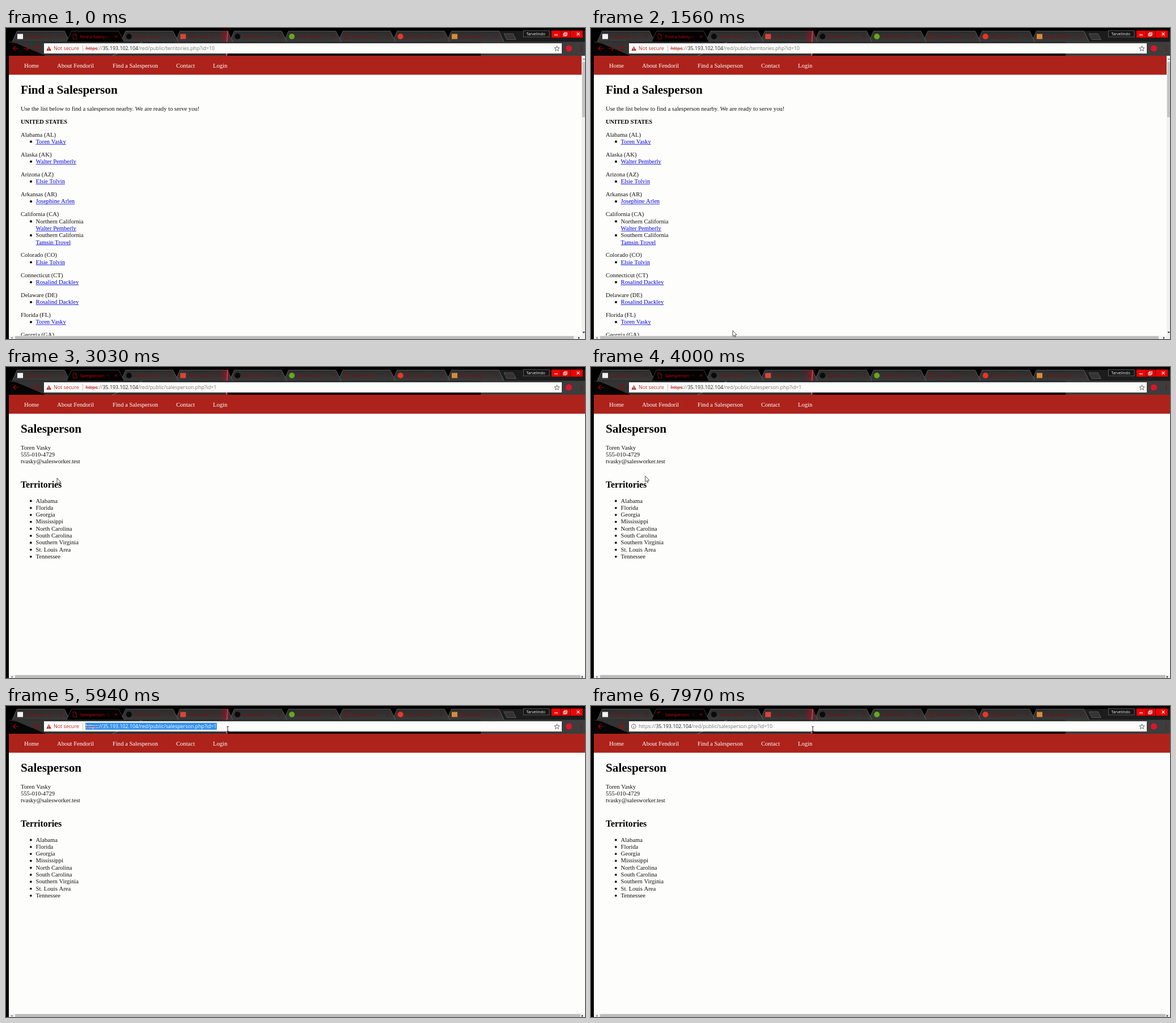
An HTML page with a canvas for the animation above (8 s loop, 1021 px wide and 549 px high).

```html
<!DOCTYPE html>
<html lang="en">
<head>
<meta charset="utf-8">
<title>Find a Salesperson</title>
<style>
html, body { margin: 0; width: 100%; height: 100%; overflow: hidden; background: #000; }
canvas { display: block; width: 1021px; height: 549px; }
</style>
</head>
<body>
<canvas id="stage" width="1021" height="549"></canvas>
<script>
const g = document.getElementById('stage').getContext('2d');
const LOOP = 8000;
const W = 1021, H = 549;
const SERIF = '"Liberation Serif", "Times New Roman", serif';
const SANS = '"Open Sans", "Noto Sans", sans-serif';
const UI = '8.85px ' + SANS;
const BODY = '10.6px ' + SERIF;
const PAPER = '#fdfdfc';

// Moments of the story, in ms
const T = { enter: 1450, click: 2520, page: 2760, select: 5300, caret: 6350, type: 7050, go: 7550 };

// Pointer path: time, x, y
const PATH = [
  [1450, 262, 560], [2130, 93, 195], [2600, 93, 195], [2900, 90, 196],
  [3950, 90, 196], [4560, 378, 15], [4770, 393, 32], [5020, 391, 40], [8000, 391, 40]
];

const STATES = [
  ['Alabama (AL)', 'Toren Vasky'],
  ['Alaska (AK)', 'Walter Pemberly'],
  ['Arizona (AZ)', 'Elsie Tolvin'],
  ['Arkansas (AR)', 'Josephine Arlen'],
  ['California (CA)', '-Northern California', 'Walter Pemberly', '-Southern California', 'Tamsin Trovel'],
  ['Colorado (CO)', 'Elsie Tolvin'],
  ['Connecticut (CT)', 'Rosalind Dackley'],
  ['Delaware (DE)', 'Rosalind Dackley'],
  ['Florida (FL)', 'Toren Vasky'],
  ['Georgia (GA)']
];
const AREAS = ['Alabama', 'Florida', 'Georgia', 'Mississippi', 'North Carolina',
  'South Carolina', 'Southern Virginia', 'St. Louis Area', 'Tennessee'];
const NAV = [['Home', 32], ['About Fendoril', 90], ['Find a Salesperson', 188], ['Contact', 300], ['Login', 365]];
const TABS = [
  ['Customer on the', 'square', '#f4f4f4'], ['', 'page'],
  ['Public issues list', 'disc', '#0a0a0a'], ['Mail: Daily Choice', 'square', '#dc4437'],
  ['Red team notes', 'disc', '#0a0a0a'], ['Hard Forum Posts', 'disc', '#65a81c'],
  ['Proposed List', 'page'], ['SQL Error Wiki', 'disc', '#ee3424'], ['Busy Guide For', 'square', '#d98a3c']
];

function box(x, y, w, h, color) { g.fillStyle = color; g.fillRect(x, y, w, h); }

function disc(x, y, r, color) {
  g.fillStyle = color;
  g.beginPath(); g.arc(x, y, r, 0, 7); g.fill();
}

function trace(pts, close) {
  g.beginPath();
  pts.forEach(([x, y], i) => i ? g.lineTo(x, y) : g.moveTo(x, y));
  if (close) g.closePath();
}

function poly(pts, fill, edge, width = 1) {
  trace(pts, true);
  if (fill) { g.fillStyle = fill; g.fill(); }
  if (edge) { g.strokeStyle = edge; g.lineWidth = width; g.stroke(); }
}

function line(pts, color, width = 1) {
  trace(pts);
  g.strokeStyle = color; g.lineWidth = width; g.stroke();
}

// Draws text and returns where it ends
function text(str, x, y, font, color) {
  g.font = font; g.fillStyle = color;
  g.fillText(str, x, y);
  return x + g.measureText(str).width;
}

function cross(x, y, r, color, width) {
  line([[x - r, y - r], [x + r, y + r]], color, width);
  line([[x + r, y - r], [x - r, y + r]], color, width);
}

function pageIcon(x, y) {
  poly([[x - 3, y - 4.5], [x + 1, y - 4.5], [x + 3.3, y - 2], [x + 3.3, y + 4.5], [x - 3, y + 4.5]], null, '#8c0b0b', 0.9);
  line([[x + 0.8, y - 4.5], [x + 0.8, y - 1.8], [x + 3.3, y - 1.8]], '#8c0b0b', 0.8);
}

function spinner(x, y, t) {
  const a = Math.PI * 1.2 + (t - 7970) / 130;
  g.strokeStyle = '#e00000'; g.lineWidth = 1.2;
  g.beginPath(); g.arc(x, y, 4.5, a, a + 1.1); g.stroke();
}

function tab(i, t, title, loading, hover) {
  const x = 95.75 * i, active = i === 1;
  const [label, kind, color] = TABS[i];
  const shape = [[x + 11, 24.5], [x + 19.5, 5.5], [x + 103, 5.5], [x + 112.5, 24.5]];
  const lit = g.createLinearGradient(0, 5, 0, 25);
  lit.addColorStop(0, hover ? '#484848' : '#2c2c2c');
  lit.addColorStop(1, hover ? '#4c4c4c' : '#393939');
  poly(shape, active ? '#020202' : lit);
  line(shape, active ? '#555' : '#707070', 0.7);

  if (active && loading) spinner(x + 25.5, 15, t);
  else if (kind === 'page') pageIcon(x + 25.5, 15);
  else if (kind === 'disc') disc(x + 25.3, 15, 5, color);
  else box(x + 20, 10.5, 10, 9, color);

  g.save();
  g.beginPath(); g.rect(x + 33, 6, 56, 17); g.clip();
  const ink = g.createLinearGradient(x + 72, 0, x + 89, 0);
  const rgb = active ? '225,0,0' : hover ? '190,5,5' : '142,4,4';
  ink.addColorStop(0, `rgba(${rgb},1)`);
  ink.addColorStop(1, `rgba(${rgb},0.1)`);
  text(active ? title : label, x + 35, 17.7, '7.5px ' + SANS, ink);
  g.restore();
  cross(x + 98, 15, 2.3, active ? '#b80000' : '#850505', 0.9);
}

function windowButtons() {
  poly([[878, 10], [894, 10], [899.5, 20.5], [883, 20.5]], '#343434', '#666', 0.7);
  box(912, 4.5, 46, 11.5, '#151515');
  g.strokeStyle = '#777'; g.lineWidth = 0.7;
  g.strokeRect(912.5, 4.8, 45.5, 11);
  text('Tarvelindo', 917.5, 13, '6.9px ' + SANS, '#f4f4f4');
  box(962, 4.5, 16, 12.5, '#f20000');
  box(978.6, 4.5, 16.4, 12.5, '#dd0000');
  box(995.8, 4.5, 21.2, 12.5, '#f20000');
  box(967, 11.5, 6, 1.3, '#fff');
  g.strokeStyle = '#fff'; g.lineWidth = 0.9;
  g.strokeRect(984.7, 8.2, 4.6, 4.6);
  g.strokeRect(983, 9.9, 4.6, 4.2);
  cross(1009, 10.6, 2.4, '#fff', 1.1);
}

function toolbar(t, detail, loading) {
  const red = '#a80000';
  box(5, 24.5, 1016, 24.5, '#333');
  box(390, 44, 447, 5, '#050505');
  box(837, 24.5, 184, 24.5, '#3d3d3d');
  poly([[5, 25], [18, 27], [70, 49], [5, 49]], '#050505');
  line([[240, 25], [188, 49]], '#888', 0.8);

  line([[22, 36], [13, 36], [17, 32]], red, 1.2);
  line([[13, 36], [17, 40]], red, 1.2);
  if (!detail) {
    line([[31, 36], [40, 36], [36, 32]], red, 1.2);
    line([[40, 36], [36, 40]], red, 1.2);
  }
  if (loading) cross(54.5, 36, 3.5, '#c00000', 1.2);
  else {
    g.strokeStyle = red; g.lineWidth = 1.2;
    g.beginPath(); g.arc(54.5, 36, 4, 0.5, 5.6); g.stroke();
    poly([[56, 34.5], [59, 34.8], [59, 31.5]], red);
  }
  box(67, 27, 913, 18, PAPER);
  box(388, 45, 2.5, 3.6, '#d65563');
  omnibox(t, detail, loading);

  const star = [];
  for (let i = 0; i < 10; i++) {
    const a = i * Math.PI / 5 - Math.PI / 2, r = i % 2 ? 2 : 4.8;
    star.push([971.5 + r * Math.cos(a), 36.5 + r * Math.sin(a)]);
  }
  poly(star, null, '#555', 0.9);
  disc(992.5, 36, 5.5, '#e1132a');
  for (const y of [32.5, 36, 39.5]) disc(1014.5, y, 0.9, '#850000');
}

function omnibox(t, detail, loading) {
  const file = detail || loading ? 'salesperson.php?id=1' : 'territories.php?id=10';
  const host = '35.193.102.104', base = 39.3;
  const editing = t >= T.type;
  const gray = '#777', black = '#222', alarm = '#b92b27';

  if (editing) {
    g.strokeStyle = '#666'; g.lineWidth = 0.9;
    g.beginPath(); g.arc(75.3, 36, 4, 0, 7); g.stroke();
    box(74.8, 35.2, 1, 3, '#666');
    box(74.8, 33.4, 1, 1, '#666');
    const soft = t < T.go ? black : gray;
    let x = text('https://', 84, base, UI, soft);
    x = text(host, x, base, UI, black);
    x = text('/red/public/salesperson.php?id=10', x, base, UI, soft);
    if (t < T.go && (t - T.type) % 1000 < 500) box(x + 0.5, 30.5, 0.8, 11, black);
    return;
  }

  poly([[75.6, 32], [80, 40], [71.2, 40]], alarm);
  box(75.1, 34.5, 1, 2.8, '#fff');
  box(75.1, 38, 1, 1, '#fff');
  text('Not secure', 84, base, UI, alarm);
  box(135, 30.5, 0.8, 11, '#c8a3a1');

  const selected = t >= T.select && t < T.caret;
  const path = '/red/public/' + file;
  g.font = UI;
  if (selected) box(140, 29.5, g.measureText('https://' + host + path).width + 0.7, 12.3, '#3390f0');
  const pick = c => selected ? '#fff' : c;
  let x = text('https', 140.3, base, UI, pick(alarm));
  box(140.3, 36, x - 140.3, 0.9, alarm);
  x = text('://', x, base, UI, pick(gray));
  x = text(host, x, base, UI, pick(black));
  x = text(path, x, base, UI, pick(gray));
  if (t >= T.caret && (t - T.caret) % 1000 < 500) box(x + 0.4, 30.5, 0.8, 11, black);
}

function browser(t, x, y) {
  const detail = t >= T.page;
  const loading = t >= T.go || (t >= T.click + 60 && t < T.page);
  box(0, 0, W, 49, '#000');
  box(834, 5, 187, 20, '#1c1c1c');
  const over = y < 24 && t > T.page ? Math.floor((x - 14) / 95.75) : -1;
  const title = detail ? 'Salesperson: Toren' : 'Find a Salesperson';
  for (let i = TABS.length - 1; i >= 0; i--) if (i !== 1) tab(i, t, title, loading, i === over);
  tab(1, t, title, loading);

  const streak = g.createLinearGradient(374, 0, 396, 0);
  streak.addColorStop(0, 'rgba(150,0,20,0)');
  streak.addColorStop(0.7, 'rgba(190,20,45,.5)');
  streak.addColorStop(1, 'rgba(150,0,20,0)');
  box(374, 5, 22, 19.5, streak);
  line([[391, 5], [389.5, 25]], '#c64757', 1.5);
  windowButtons();
  toolbar(t, detail, loading);
}

function listPage() {
  text('Find a Salesperson', 26, 116.4, 'bold 21.2px ' + SERIF, '#000');
  text('Use the list below to find a salesperson nearby. We are ready to serve you!', 26, 145.6, BODY, '#111');
  text('UNITED STATES', 26, 168.6, 'bold 10.5px ' + SERIF, '#000');
  let y = 191.5;
  for (const [state, ...rows] of STATES) {
    text(state, 26, y, BODY, '#111');
    rows.forEach((row, i) => {
      y += 12.3;
      const plain = row[0] === '-';
      if (plain || i === 0) box(42.2, y - 5, 3.6, 3.6, '#111');
      if (plain) text(row.slice(1), 52.6, y, BODY, '#111');
      else {
        const end = text(row, 52.6, y, BODY, '#0000d8');
        box(52.6, y + 1.1, end - 52.6, 0.8, '#0000d8');
      }
    });
    y += 22.9;
  }
}

function detailPage() {
  text('Salesperson', 26, 116.4, 'bold 21.2px ' + SERIF, '#000');
  ['Toren Vasky', '555-010-4729', 'tvasky@salesworker.test'].forEach((row, i) =>
    text(row, 26, 145.6 + i * 12.3, BODY, '#111'));
  text('Territories', 26, 212.6, 'bold 15.8px ' + SERIF, '#000');
  AREAS.forEach((row, i) => {
    const y = 239.5 + i * 12.29;
    disc(43.8, y - 3, 1.9, '#111');
    text(row, 52.6, y, BODY, '#111');
  });
}

function scrollbars(detail) {
  const right = detail ? W : 1015;
  box(5, 543.5, 1016, 5.5, '#f0f0f0');
  box(16, 543.8, detail ? 997 : 985, 5.2, '#bdbdbd');
  poly([[8.5, 547], [11.5, 545], [11.5, 549]], '#777');
  poly([[right - 3, 547], [right - 6, 545], [right - 6, 549]], '#333');
  if (detail) return;
  box(1015, 49, 6, 494.5, '#f0f0f0');
  box(1016, 60, 5, 97.5, '#c4c4c4');
  poly([[1017, 56], [1021, 56], [1019, 53.5]], '#777');
  poly([[1016.5, 536], [1021, 536], [1018.8, 539]], '#333');
}

function content(detail) {
  box(5, 49, 1016, 500, PAPER);
  box(5, 49, detail ? 1016 : 1010, 33.5, '#ad231b');
  for (const [label, x] of NAV) text(label, x, 70, BODY, '#fff');
  g.save();
  g.beginPath(); g.rect(5, 82, 1016, 461); g.clip();
  if (detail) detailPage(); else listPage();
  g.restore();
  scrollbars(detail);
  box(0, 0, 5, H, '#000');
}

function pointerAt(t) {
  let i = 0;
  while (i < PATH.length - 2 && t >= PATH[i + 1][0]) i++;
  const [t0, x0, y0] = PATH[i], [t1, x1, y1] = PATH[i + 1];
  const k = Math.max(0, Math.min(1, (t - t0) / (t1 - t0)));
  const s = k * k * (3 - 2 * k);
  return [x0 + (x1 - x0) * s, y0 + (y1 - y0) * s];
}

function pointer(t, x, y) {
  if (t < T.enter) return;
  g.save();
  g.translate(x, y);
  if (y > 27 && y < 45) {
    line([[-2, -4], [0, -3.4], [2, -4]], '#222', 0.9);
    line([[0, -3.4], [0, 4.2]], '#222', 1);
    line([[-2, 4.8], [0, 4.2], [2, 4.8]], '#222', 0.9);
  } else if (t < T.page && x > 52 && x < 108 && y > 193 && y < 207) {
    poly([[-0.8, 0], [0.9, 0], [1.2, 4], [5.6, 5], [6.2, 6.3], [5.3, 11.5], [-0.2, 11.5],
      [-3.2, 7.4], [-2.7, 6.3], [-0.9, 7.4]], '#fff', '#222', 0.9);
    line([[2.4, 4.6], [2.4, 6.4]], '#222', 0.6);
    line([[4, 4.8], [4, 6.6]], '#222', 0.6);
  } else {
    poly([[0, 0], [0, 10.5], [2.3, 8.4], [3.8, 11.6], [5.3, 10.9], [3.9, 7.8], [7, 7.6]], '#fff', '#222', 0.8);
  }
  g.restore();
}

function draw(t) {
  const [x, y] = pointerAt(t);
  content(t >= T.page);
  browser(t, x, y);
  pointer(t, x, y);
}

const start = performance.now();
function tick() {
  draw((performance.now() - start) % LOOP);
  requestAnimationFrame(tick);
}
tick();
</script>
</body>
</html>
```
